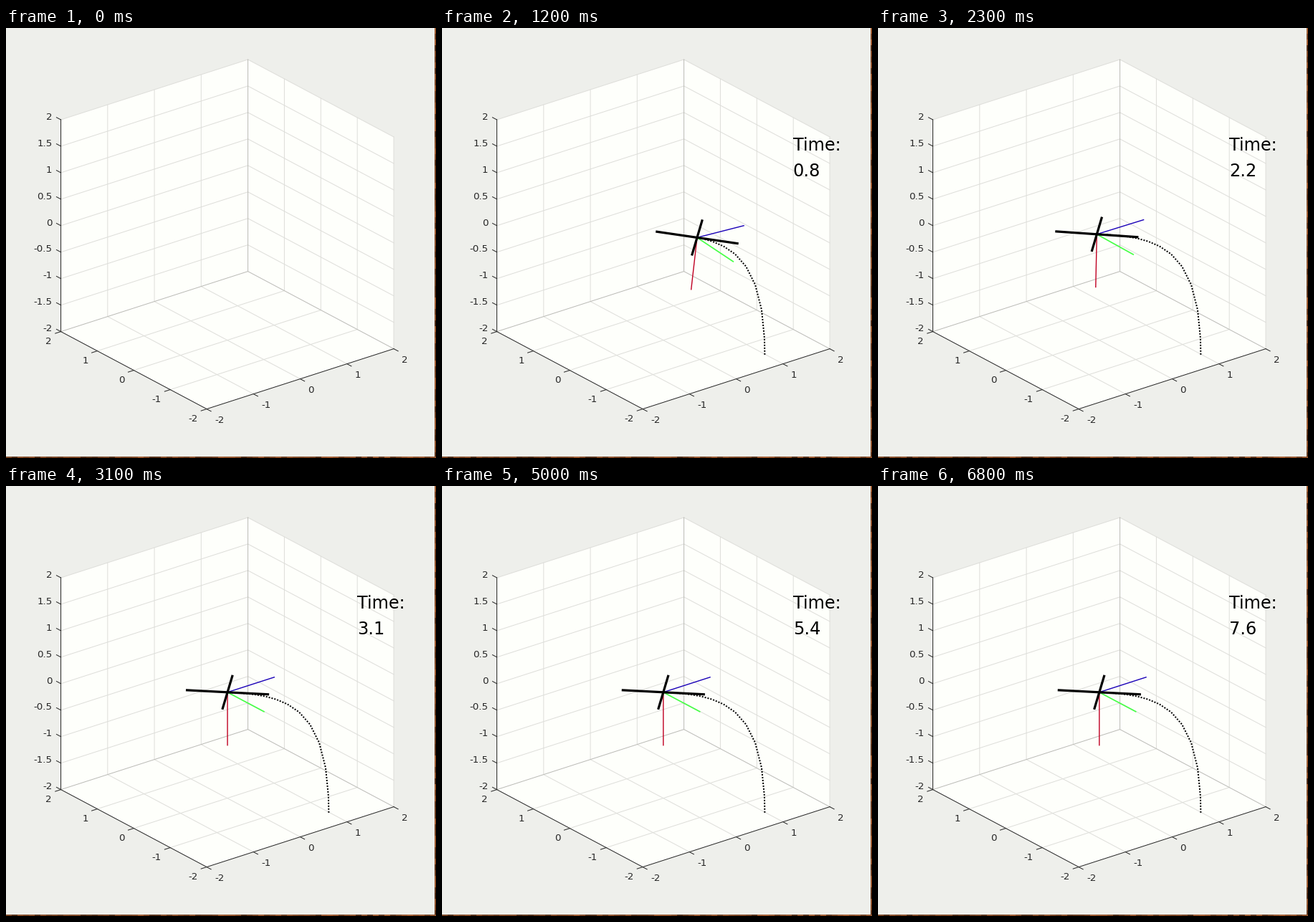
A matplotlib script that plays this animation: 600x600 px, repeating every 6.9 s.

```python
import numpy as np
import matplotlib.pyplot as plt
from matplotlib.animation import FuncAnimation

SIZE, DPI = 600, 100
FRAMES, STEP_MS = 69, 100
BLANK = 5                                  # empty frames before the flight
HELD = {13, 15, 29, 45, 59, 61, 65}        # the display stalls here
DT = 0.12                                  # simulated seconds per frame
PT = 72 / DPI

ORIGIN = np.array([308.8, 287.8])
BASIS = np.array([[65.25, -21.0], [-50.87, -27.0], [0, -73.9]])
FLIP = np.array([1, -1, -1])               # north-east-down to plot axes

plt.rcParams["font.family"] = "DejaVu Sans"
fig = plt.figure(figsize=(SIZE / DPI, SIZE / DPI), dpi=DPI, facecolor="#eeefeb")
ax = fig.add_axes([0, 0, 1, 1])
ax.axis("off")


def project(p):
    return ORIGIN + np.asarray(p, float) @ BASIS


def stroke(color, width, points=None, **kw):
    x, y = ([], []) if points is None else project(points).T
    return ax.plot(x, y, color=color, lw=width * PT, snap=False, **kw)[0]


def label(x, y, text, px, **kw):
    return ax.text(x, y, text, fontsize=px * PT, **kw)


# ---- box, grid, ticks
WALL, GRID, EDGE, INK = "#fefffb", "#dededa", "#bcbcb8", "#262626"
TICK = 0.12
square = np.array([(-2, -2), (2, -2), (2, 2), (-2, 2)])
for axis, side in enumerate((2, 2, -2)):
    ax.fill(*project(np.insert(square, axis, side, axis=1)).T, color=WALL, lw=0)

for v in (-1, 0, 1):
    stroke(GRID, 1, [(v, -2, -2), (v, 2, -2), (v, 2, 2)])
    stroke(GRID, 1, [(-2, v, -2), (2, v, -2), (2, v, 2)])
for v in np.arange(-1.5, 2.1, 0.5):
    stroke(GRID, 1, [(-2, 2, v), (2, 2, v), (2, -2, v)])
stroke(GRID, 1, [(2, -2, -2), (2, -2, 2)])
stroke(EDGE, 1, [(-2, 2, -2), (2, 2, -2), (2, -2, -2)])
stroke(EDGE, 1, [(2, 2, -2), (2, 2, 2)])
stroke(INK, 1, [(-2, 2, 2), (-2, 2, -2), (-2, -2, -2), (2, -2, -2)])


def tick(at, out, dx, dy, value, ha):
    stroke(INK, 1, [at, np.add(at, out)])
    x, y = project(at)
    label(x + dx, y + dy, f"{value:g}", 40 / 3, color=INK, ha=ha, va="center_baseline")


for v in np.arange(-2, 2.1, 0.5):
    tick((-2, 2, v), (0, TICK, 0), -12, -5.3, v, "right")
for v in range(-2, 3):
    tick((-2, v, -2), (-TICK, 0, 0), -12.5, 12.3, v, "right")
    tick((v, -2, -2), (0, -TICK, 0), 11, 14.8, v, "left")

# ---- strip of desktop along the right and bottom edges
rng = np.random.default_rng(4)
for extent, shape in (((598, 600, 600, 0), (-1, 1, 3)), ((0, 600, 600, 598), (1, -1, 3))):
    grain = np.repeat(rng.uniform(0.6, 1.3, 75), 8)
    rgb = np.clip(np.outer(grain, (0.5, 0.29, 0.16)), 0, 1)
    ax.imshow(rgb.reshape(shape), extent=extent, aspect="auto", interpolation="nearest")
ax.set_xlim(0, SIZE)
ax.set_ylim(SIZE, 0)


# ---- flight
def position(t):
    """Damped flight from (1, -1.5, -2) to the origin."""
    t = np.asarray(t, float)
    s = 1.8 * (np.hypot(t, 0.14) - 0.14) + 0.04 * t ** 3
    h = np.exp(-s) * (np.cos(s) + np.sin(s))
    drop = 168 * (1 + 6.5 * t) * np.exp(-6.5 * t)
    z = -(drop - 19.5 * h) / 73.9
    return np.stack([h, -1.5 * h, z], axis=-1)


def attitude(t):
    """Rows are the body axes; the tilt first pulls inwards, then brakes."""
    q = 1.035 * t * (1 - t / 0.72) * np.exp(-1.289 * t * t)
    down = np.array([q, 1.5 * q, np.sqrt(1 - 3.25 * q * q)])
    fwd = np.array([down[2], 0, -down[0]]) / np.hypot(down[0], down[2])
    return np.array([fwd, np.cross(down, fwd), down]) * FLIP


def clip(a, b, lim=2.012):
    """Part of segment a-b inside the plot box, as screen points."""
    w = np.linspace(0, 1, 201)[:, None]
    pts = a + w * (b - a)
    inside = pts[(np.abs(pts) <= lim).all(axis=1)]
    return project(inside[[0, -1]]) if len(inside) > 1 else np.full((2, 2), np.nan)


trail = stroke("black", 2, linestyle=(0, (1, 1)), dash_capstyle="butt", zorder=4)
axes3 = [stroke(c, w, zorder=5)
         for c, w in (("#1a00b8", 1.4), ("#45ff45", 1.7), ("#c00022", 1.4))]
arms = [stroke("black", 3.2, solid_capstyle="butt", zorder=6) for _ in range(2)]
title = label(489.8, 170.9, "Time:", 24, va="baseline", zorder=7)
clock = label(489.8, 207.2, "", 24, va="baseline", zorder=7)
parts = [trail, *axes3, *arms, title, clock]


def draw(frame):
    shown = frame >= BLANK
    for p in parts:
        p.set_visible(shown)
    if not shown:
        return parts
    t = (frame - BLANK - (frame in HELD)) * DT
    pos, rot = position(t), attitude(t)
    trail.set_data(*project(position(np.append(np.arange(0, t, 0.1), t))).T)
    for ln, axis in zip(axes3, rot):
        ln.set_data(*clip(pos, pos + axis).T)
    for ln, side in zip(arms, (1, -1)):
        arm = (rot[0] + side * rot[1]) / 2
        ln.set_data(*clip(pos - arm, pos + arm).T)
    clock.set_text(f"{round(t, 1):g}")
    return parts


anim = FuncAnimation(fig, draw, frames=FRAMES, interval=STEP_MS,
                     init_func=lambda: draw(0), repeat=True, repeat_delay=0, blit=False)
plt.show()
```
